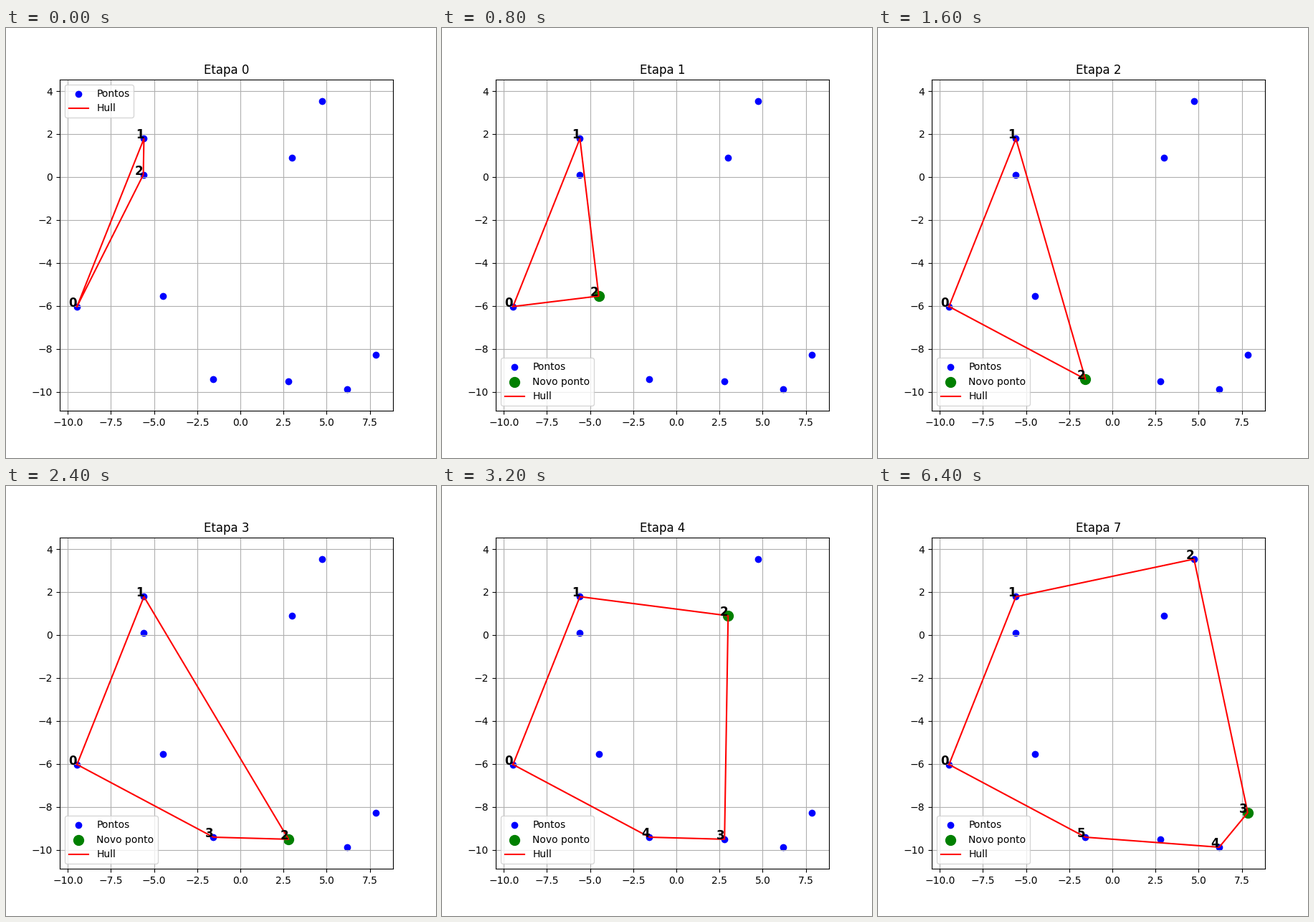
These frames come from a looping animation (600 px wide and 600 px high, 8000 ms). A matplotlib script:

```python
import random

import matplotlib.pyplot as plt
import numpy as np
from matplotlib.animation import FuncAnimation

NUM_POINTS = 10
LAST_STAGE = NUM_POINTS - 3
GROWING_FRAMES = 5  # afterwards the complete hull is held
NUM_FRAMES = 10
INTERVAL = 800

random.seed(42)
POINTS = np.array(sorted((random.uniform(-10, 10), random.uniform(-10, 10))
                         for _ in range(NUM_POINTS)))


def cross(o, a, b):
    return (a[0] - o[0]) * (b[1] - o[1]) - (a[1] - o[1]) * (b[0] - o[0])


def chain(points):
    """Keep only the clockwise turns along a sequence of points."""
    kept = []
    for p in points:
        while len(kept) > 1 and cross(kept[-2], kept[-1], p) >= 0:
            kept.pop()
        kept.append(p)
    return kept


def convex_hull(points):
    """Clockwise hull of x-sorted points, starting at the leftmost."""
    return np.array(chain(points)[:-1] + chain(points[::-1])[:-1])


fig, ax = plt.subplots(figsize=(6, 6), dpi=100)


def update(frame):
    stage = frame if frame < GROWING_FRAMES else LAST_STAGE
    count = stage + 3
    hull = convex_hull(POINTS[:count])
    closed = np.vstack([hull, hull[:1]])

    ax.clear()
    ax.scatter(*POINTS.T, color="blue", label="Pontos")
    if stage:
        ax.scatter(*POINTS[count - 1], color="green", s=100, label="Novo ponto")
    ax.plot(*closed.T, color="red", label="Hull")
    for i, (x, y) in enumerate(hull):
        ax.text(x, y, str(i), fontsize=12, fontweight="bold", ha="right")

    low, high = POINTS.min(axis=0) - 1, POINTS.max(axis=0) + 1
    ax.set_xlim(low[0], high[0])
    ax.set_ylim(low[1], high[1])
    ax.set_title(f"Etapa {stage}")
    ax.legend(loc="lower left" if stage else "upper left")
    ax.grid(True)


anim = FuncAnimation(fig, update, frames=NUM_FRAMES, init_func=lambda: None,
                     interval=INTERVAL, repeat=True, repeat_delay=0)
plt.show()
```
